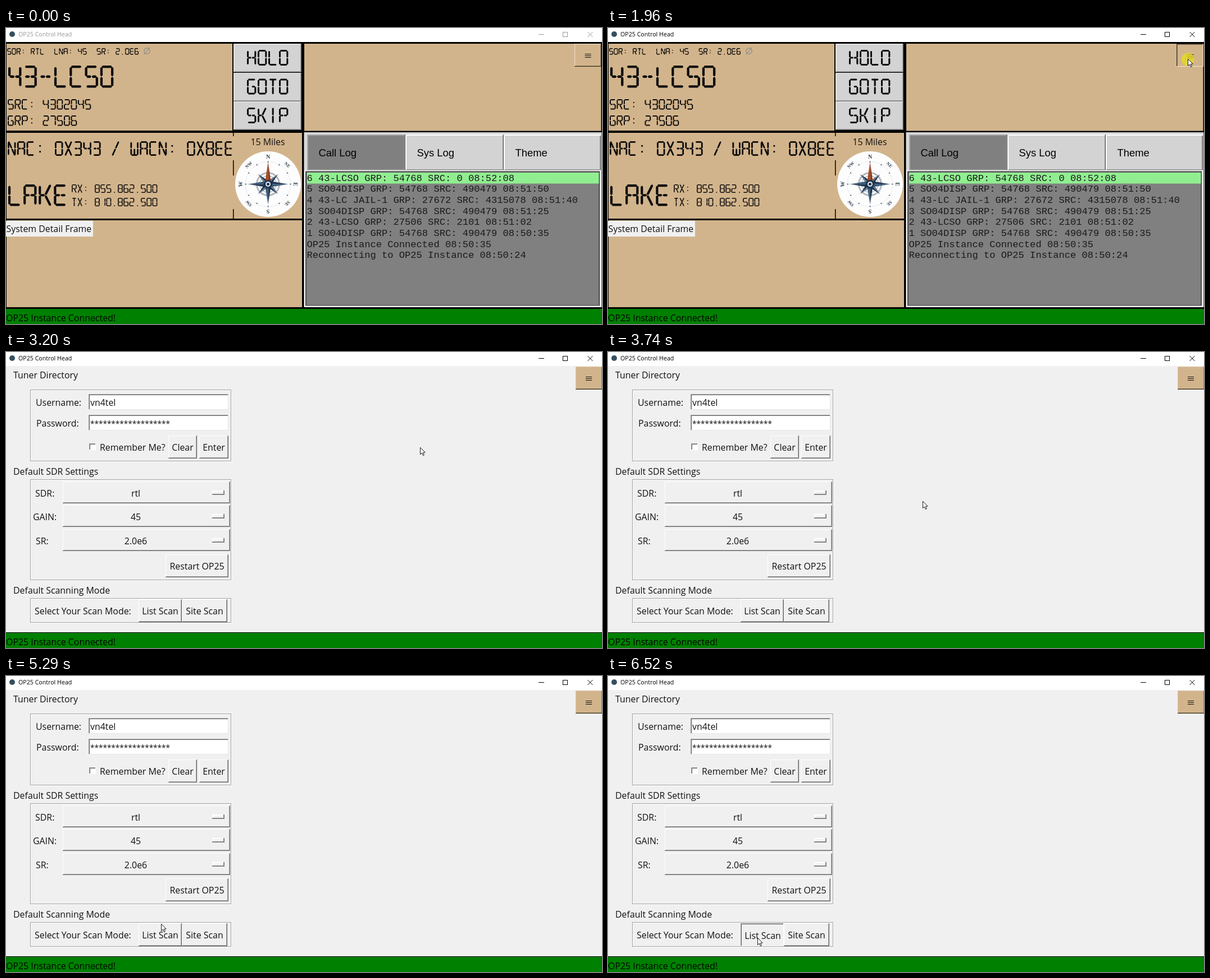
An HTML page with a canvas for the animation above (8000 ms loop, 1061 by 528 pixels).

```html
<!DOCTYPE html>
<html lang="en">
<head>
<meta charset="utf-8">
<title>OP25 Control Head</title>
<style>
html, body { margin: 0; width: 100%; height: 100%; overflow: hidden; background: #fff; }
canvas { display: block; }
</style>
</head>
<body>
<canvas id="stage" width="1061" height="528"></canvas>
<script>
const ctx = document.getElementById('stage').getContext('2d');
const LOOP = 8000, ACTIVE = 1960, SETTINGS = 2110, PRESS = 6350, PRESS_GLOW_END = 6520;
const TAN = '#d2b48c', GREY = '#808080', LIGHT = '#d3d3d3', FACE = '#f0f0f0';
const UI = '15.9px "Open Sans", "Noto Sans", sans-serif';
const TAB = '18.4px "Liberation Sans", Arial, sans-serif';
const LOG = '17.13px "Liberation Mono", "Courier New", monospace';

function box(x, y, w, h, color) {
  ctx.fillStyle = color;
  ctx.fillRect(x, y, w, h);
}

function text(s, x, base, font = UI, color = '#111', align = 'left') {
  ctx.font = font;
  ctx.fillStyle = color;
  ctx.textAlign = align;
  ctx.fillText(s, x, base);
}

function line(points, color, width = 1) {
  ctx.strokeStyle = color;
  ctx.lineWidth = width;
  ctx.beginPath();
  points.forEach(([x, y], i) => i ? ctx.lineTo(x, y) : ctx.moveTo(x, y));
  ctx.stroke();
}

function poly(points, color) {
  ctx.fillStyle = color;
  ctx.beginPath();
  points.forEach(([x, y]) => ctx.lineTo(x, y));
  ctx.closePath();
  ctx.fill();
}

function disc(x, y, r, color) {
  ctx.fillStyle = color;
  ctx.beginPath();
  ctx.arc(x, y, r, 0, Math.PI * 2);
  ctx.fill();
}

function ring(x, y, r, color, width) {
  ctx.strokeStyle = color;
  ctx.lineWidth = width;
  ctx.beginPath();
  ctx.arc(x, y, r, 0, Math.PI * 2);
  ctx.stroke();
}

function raised(x, y, w, h, face = FACE, hi = '#fff', mid = '#a0a0a0', dark = '#696969') {
  box(x, y, w, h, dark);
  box(x, y, w - 1, h - 1, hi);
  box(x + 1, y + 1, w - 2, h - 2, mid);
  box(x + 1, y + 1, w - 3, h - 3, face);
}

function sunken(x, y, w, h, face = FACE, hi = '#fff', mid = '#a0a0a0', dark = '#696969') {
  box(x, y, w, h, hi);
  box(x, y, w - 1, h - 1, mid);
  box(x + 1, y + 1, w - 2, h - 2, dark);
  box(x + 2, y + 2, w - 3, h - 3, face);
}

function groove(x, y, w, h) {
  ctx.lineWidth = 1;
  ctx.strokeStyle = '#fff';
  ctx.strokeRect(x + 1.5, y + 1.5, w - 2, h - 2);
  ctx.strokeStyle = '#a0a0a0';
  ctx.strokeRect(x + .5, y + .5, w - 2, h - 2);
}

// Segment display: a-f outer ring, g h middle, i l upright, j k m n diagonals
const SEGMENTS = {
  0: 'abcdef', 1: 'bc', 2: 'abghed', 3: 'abghcd', 4: 'fghbc', 5: 'afghcd', 6: 'afghcde',
  7: 'abc', 8: 'abcdefgh', A: 'abcefgh', B: 'abcdefgh', C: 'adef', D: 'abcdef',
  E: 'adefgh', G: 'afedch', H: 'febcgh', I: 'il', K: 'fegkm', L: 'fed', N: 'febcjm',
  O: 'abcdef', P: 'abefgh', R: 'abefghm', S: 'afghcd', T: 'ail', W: 'fedcbl',
  X: 'jkmn', '/': 'kn', '-': 'gh'
};

function segmentEnds(w, h, t) {
  const l = t / 2, r = w - l, c = w / 2, m = h / 2, b = h - l;
  return {
    a: [l, l, r, l], b: [r, l, r, m], c: [r, m, r, b], d: [l, b, r, b],
    e: [l, m, l, b], f: [l, l, l, m], g: [l, m, c, m], h: [c, m, r, m],
    i: [c, 0, c, m], l: [c, m, c, h],
    j: [l, 0, c, m], k: [r, 0, c, m], m: [c, m, r, h], n: [c, m, l, h]
  };
}

function segment([ax, ay, bx, by], t) {
  const len = Math.hypot(bx - ax, by - ay), ux = (bx - ax) / len, uy = (by - ay) / len;
  const k = t / 2, gap = t * .07;
  const at = (d, s) => [ax + ux * d - uy * s, ay + uy * d + ux * s];
  poly([at(gap, 0), at(k, k), at(len - k, k), at(len - gap, 0), at(len - k, -k), at(k, -k)], '#0a0a0a');
}

function lcd(s, x, y, h, step) {
  const t = Math.max(1.4, h * .108), w = step * .86, ends = segmentEnds(w, h, t);
  [...s].forEach((ch, i) => {
    ctx.save();
    ctx.translate(x + i * step, y);
    if (ch === '.') box(w / 2 - t / 2, h - t, t, t, '#0a0a0a');
    if (ch === ':') [.32, .72].forEach(v => box(w / 2 - t / 2, h * v - t / 2, t, t, '#0a0a0a'));
    for (const id of SEGMENTS[ch] || '') segment(ends[id], t);
    ctx.restore();
  });
}

function compass(cx, cy) {
  const navy = '#1d3450', rust = '#a8481c';
  ctx.save();
  ctx.translate(cx, cy);
  disc(0, 0, 58.5, '#fdfdfd');
  for (let i = 0; i < 72; i++) {
    const a = i * Math.PI / 36, r = i % 6 ? 39.5 : 38.5;
    line([[r * Math.cos(a), r * Math.sin(a)], [41 * Math.cos(a), 41 * Math.sin(a)]],
      i % 6 ? '#a5adb4' : navy, i % 6 ? .6 : 1.3);
  }
  ring(0, 0, 20, '#b2b8be', 3);
  ring(0, 0, 15, '#8996a1', 1);
  const spike = (angle, len, half, one, two) => {
    ctx.save();
    ctx.rotate(angle);
    poly([[0, -len], [-half, -half], [0, 0]], one);
    poly([[0, -len], [half, -half], [0, 0]], two);
    ctx.restore();
  };
  for (let i = 0; i < 4; i++) spike((i + .5) * Math.PI / 2, 25, 4.5, '#66798a', navy);
  for (let i = 0; i < 4; i++) {
    spike(i * Math.PI / 2, i ? 36 : 40, 5, i ? navy : rust, i ? '#365875' : '#8d3a16');
  }
  disc(0, 0, 7.5, navy);
  disc(0, 0, 4.5, '#e8edf0');
  disc(0, 0, 2.5, navy);
  ['N', 'NE', 'E', 'SE', 'S', 'SW', 'W', 'NW'].forEach((s, i) => {
    ctx.save();
    ctx.rotate(i * Math.PI / 4);
    const font = `bold ${i % 2 ? 8 : 10}px "Liberation Serif", serif`;
    text(s, 0, i % 2 ? -46 : -45.5, font, '#30404d', 'center');
    ctx.restore();
  });
  ctx.restore();
}

function titleBar(active) {
  const ink = active ? '#000' : '#999';
  box(0, 0, 1061, 25, '#fff');
  disc(11, 11, 5, '#35505f');
  text('OP25 Control Head', 22, 15, '10.65px "Open Sans", "Noto Sans", sans-serif', ink);
  line([[948, 11.5], [958, 11.5]], ink);
  ctx.strokeRect(991.5, 7.5, 8, 8);
  line([[1035.5, 7], [1044.5, 16]], ink);
  line([[1044.5, 7], [1035.5, 16]], ink);
}

function menuIcon(x, y) {
  [-3, 0, 3].forEach(d => box(x - 5.5, y + d - .5, 11, 1, '#111'));
}

function statusBar() {
  box(0, 501, 1061, 27, '#008000');
  text('OP25 Instance Connected!', 0, 522.5, UI, '#000');
}

function controlView(pressed) {
  box(0, 25, 1061, 476, '#000');
  box(1, 28, 402, 155, TAN);
  box(1, 187, 526, 153, TAN);
  box(1, 343, 526, 155, TAN);
  box(531, 28, 528.5, 155.5, TAN);
  [[187, 6], [236, 27], [323, 17]].forEach(([y, h]) => box(404, y, 1.5, h, '#000'));

  lcd('SDR: RTL  LNA: 45  SR: 2.0E6', 2, 36, 11.5, 8.4);
  ring(251, 41, 5.2, '#85898a', 1.2);
  line([[245.5, 47.5], [256.5, 34.5]], '#85898a', 1.1);
  lcd('43-LCSO', 4, 67, 39.5, 27.3);
  lcd('SRC: 4302045', 3, 127, 18.5, 12.5);
  lcd('GRP: 27506', 3, 156, 18.5, 12.5);
  lcd('NAC: 0X343 / WACN: 0XBEE', 3, 202, 26, 16.8);
  lcd('LAKE', 4, 279, 38.5, 27.1);
  lcd('RX: 855.862.500', 117, 279, 15, 10.25);
  lcd('TX: 810.862.500', 117, 303, 15, 10.25);

  ['HOLD', 'GOTO', 'SKIP'].forEach((s, i) => {
    const y = 28 + i * 51.5;
    raised(405, Math.round(y), 121, 51, LIGHT, '#f4f4f4');
    lcd(s, 429, y + 11, 28, 19);
  });

  text('15 Miles', 466, 209, UI, '#111', 'center');
  compass(466.5, 278.5);
  box(0, 344, 155, 28, FACE);
  text('System Detail Frame', .5, 364);

  if (pressed) sunken(1012, 28, 48, 41, TAN, '#f2e6d3', '#4a4033', '#7e6c54');
  else raised(1012, 28, 48, 41, TAN, '#f0e2cc', '#95805f', '#3d3428');
  menuIcon(pressed ? 1037 : 1036, pressed ? 50.5 : 49.5);

  box(530.5, 186, 530, 312, '#d9d9d9');
  ['Call Log', 'Sys Log', 'Theme'].forEach((s, i) => {
    const x = 536 + i * 175, edge = i ? '#fff' : '#a6a6a6';
    raised(x, 190, i < 2 ? 175 : 173, 64, i ? LIGHT : GREY, edge, '#9a9a9a', '#555');
    box(x, 190, 2, 63, edge);
    box(x, 190, 173, 2, edge);
    text(s, x + 20.5, 229, TAB, '#000');
  });

  box(531, 253.5, 528, 244, '#fff');
  box(533, 255.5, 524, 240, '#303030');
  box(534.5, 257, 521, 237.5, GREY);
  box(536, 258, 519.5, 19.5, '#90ee90');
  [
    '6 43-LCSO GRP: 54768 SRC: 0 08:52:08',
    '5 SO04DISP GRP: 54768 SRC: 490479 08:51:50',
    '4 43-LC JAIL-1 GRP: 27672 SRC: 4315078 08:51:40',
    '3 SO04DISP GRP: 54768 SRC: 490479 08:51:25',
    '2 43-LCSO GRP: 27506 SRC: 2101 08:51:02',
    '1 SO04DISP GRP: 54768 SRC: 490479 08:50:35',
    'OP25 Instance Connected 08:50:35',
    'Reconnecting to OP25 Instance 08:50:24'
  ].forEach((s, i) => text(s, 535.5, 272.6 + i * 19.65, LOG, '#1a1a1a'));
}

function button(s, x, y, w, h, down) {
  (down ? sunken : raised)(x, y, w, h);
  const d = down ? 1 : 0;
  text(s, x + w / 2 + d, y + h / 2 + 6 + d, UI, '#111', 'center');
}

function optionMenu(value, x, y) {
  raised(x, y, 298, 39);
  text(value, x + 130, y + 26.5, UI, '#111', 'center');
  box(x + 266, y + 16, 22, 8, '#848484');
  box(x + 266, y + 16, 20, 6, '#fff');
  box(x + 268, y + 18, 17.5, 3.5, FACE);
}

function settingsView(pressed) {
  box(0, 25, 1061, 475, FACE);
  box(0, 500, 1061, 1, '#000');
  raised(1014, 26, 48, 41, TAN, '#dcc5a5', '#95805f', '#3d3428');
  menuIcon(1037.5, 47.5);

  text('Tuner Directory', 13, 47);
  groove(43, 67, 359, 129);
  text('Username:', 53, 96);
  text('Password:', 54, 133);
  sunken(147, 75, 249, 28, '#fff', '#e6e6e6');
  sunken(147, 112, 249, 28, '#fff', '#e6e6e6');
  text('vn4tel', 150, 96);
  text('*'.repeat(19), 150, 132.5, '13.55px "Open Sans", "Noto Sans", sans-serif');
  sunken(148, 163, 12, 12, '#fff');
  text('Remember Me?', 167, 176);
  button('Clear', 289, 149, 51, 41);
  button('Enter', 344, 149, 52, 41);

  text('Default SDR Settings', 13, 219);
  groove(43, 227, 359, 181);
  [['SDR:', 52, 'rtl'], ['GAIN:', 48, '45'], ['SR:', 53, '2.0e6']].forEach(([name, x, value], i) => {
    const y = 231 + Math.round(i * 42.3);
    text(name, x, y + 26.5);
    optionMenu(value, 101, y);
  });
  button('Restart OP25', 284, 361, 112, 41);

  text('Default Scanning Mode', 13, 431);
  groove(43, 439, 359, 45);
  text('Select Your Scan Mode:', 51, 468);
  button('List Scan', 236, 441, 77, 41, pressed);
  button('Site Scan', 313, 441, 81, 41);
}

// Each move: first step, last step, step count, end point
const MOVES = [
  [500, 500, 1, 1001, 228], [650, 1040, 6, 1031, 78], [1270, 1730, 7, 1032, 55],
  [2740, 3200, 7, 737, 170], [3430, 3740, 5, 560, 266], [3970, 4430, 7, 401, 357],
  [4660, 5290, 9, 276, 442], [5370, 5440, 2, 270, 450], [5520, 5740, 4, 266, 467]
];

function pointerAt(t) {
  if (t < 420) return t >= 190 && t < 270 ? [981, 500] : null;
  let x = 1001, y = 230;
  for (const [from, to, n, ex, ey] of MOVES) {
    if (t < from) break;
    const step = n > 1 ? (to - from) / (n - 1) : 1;
    const u = Math.min(n, Math.floor((t - from) / step + 1e-6) + 1) / n;
    const k = u * u * (3 - 2 * u);
    x += (ex - x) * k;
    y += (ey - y) * k;
  }
  return [Math.round(x), Math.round(y)];
}

function pointer(x, y) {
  const shape = [[0, 0], [0, 12.3], [2.9, 9.7], [4.9, 14.2], [6.8, 13.4], [4.9, 9], [8.7, 8.8]]
    .map(([dx, dy]) => [x + .5 + dx, y + .3 + dy]);
  poly(shape, '#fff');
  ctx.lineJoin = 'round';
  line([...shape, shape[0]], '#000', .9);
  ctx.lineJoin = 'miter';
}

function draw() {
  const t = performance.now() % LOOP;
  const opening = t >= ACTIVE && t < SETTINGS;
  const picking = t >= PRESS;
  if (t < SETTINGS) controlView(opening);
  else settingsView(picking);
  titleBar(t >= ACTIVE);
  statusBar();
  const at = pointerAt(t);
  if (at) {
    if (opening || (picking && t < PRESS_GLOW_END)) {
      disc(at[0] + .3, at[1] + 1, 11.5, 'rgba(230, 218, 30, .78)');
    }
    pointer(...at);
  }
  requestAnimationFrame(draw);
}
draw();
</script>
</body>
</html>
```
